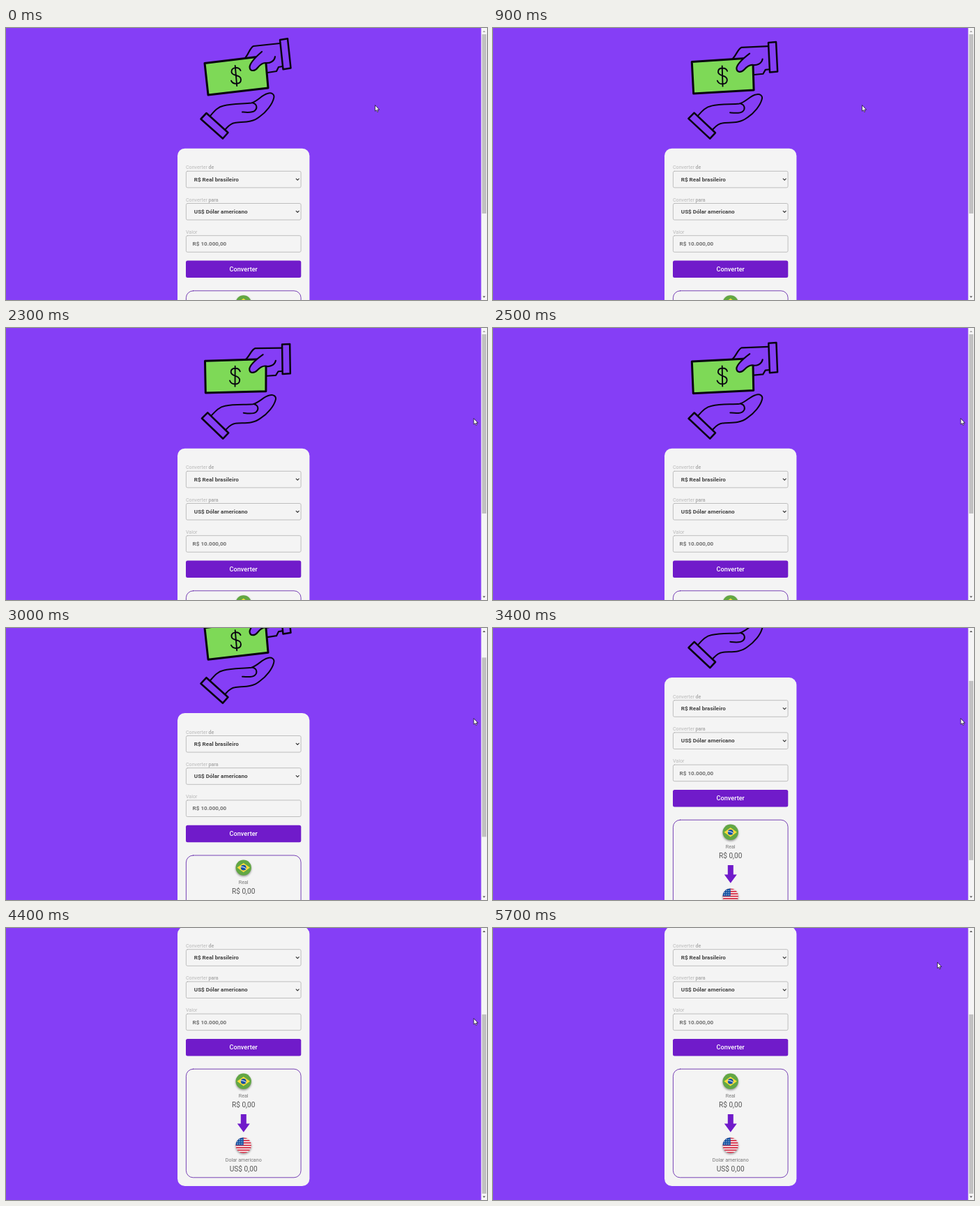
Animation of 690 by 390 pixels, one loop 5800 ms. Source, as an HTML page with a canvas:

```html
<!DOCTYPE html>
<html lang="pt-BR">
<head>
<meta charset="utf-8">
<title>Conversor de moedas</title>
<style>
html, body { margin: 0; width: 100%; height: 100%; overflow: hidden; background: #853ef6; }
canvas { display: block; width: 690px; height: 390px; }
</style>
</head>
<body>
<canvas id="stage" width="690" height="390"></canvas>
<script>
const ctx = document.getElementById('stage').getContext('2d');
const LOOP = 5800, STEP = 100;
const PURPLE = '#853ef6', DEEP = '#701bca', PANEL = '#f4f4f4', INK = '#090510';
const MID = 340.7;

// Keys are [time, value, value...]
const SWING = [[0, 0], [650, 1], [1250, 0], [2000, 1], [2300, 1], [2900, 0], [3000, 0], [3600, 1], [4200, 0]];
const POINTER = [[1400, 529.5, 111], [1600, 555, 114], [1800, 622, 145], [1900, 650, 165], [2000, 667, 150],
  [2100, 671, 130], [5100, 671, 130], [5300, 654, 108], [5500, 624, 68], [5600, 629, 56], [5700, 637.5, 49.5]];
const NOTCHES = [[2500, 50.8], [3050, 50.8], [3400, 50.8], [3750, 22.2]];

const clamp = x => Math.max(0, Math.min(1, x));
const smooth = x => x * x * (3 - 2 * x);

function sample(keys, t, ease = x => x) {
  let i = keys.findIndex(k => k[0] > t);
  if (i === 0) return keys[0].slice(1);
  if (i < 0) return keys[keys.length - 1].slice(1);
  const a = keys[i - 1], b = keys[i];
  const p = ease((t - a[0]) / (b[0] - a[0]));
  return a.slice(1).map((v, n) => v + (b[n + 1] - v) * p);
}

const scrollAt = t => NOTCHES.reduce((sum, [start, size]) => sum + size * smooth(clamp((t - start) / 250)), 0);

function shape(d, fill, stroke, width = 1) {
  const path = new Path2D(d);
  if (fill) { ctx.fillStyle = fill; ctx.fill(path); }
  if (stroke) { ctx.strokeStyle = stroke; ctx.lineWidth = width; ctx.stroke(path); }
}

function box(x, y, w, h, r, fill, stroke) {
  ctx.beginPath();
  ctx.roundRect(x, y, w, h, r);
  if (fill) { ctx.fillStyle = fill; ctx.fill(); }
  if (stroke) { ctx.strokeStyle = stroke; ctx.lineWidth = 0.9; ctx.stroke(); }
}

function disc(x, y, r, fill) {
  ctx.beginPath();
  ctx.arc(x, y, r, 0, Math.PI * 2);
  ctx.fillStyle = fill;
  ctx.fill();
}

function text(str, x, y, size, color, weight = 400, align = 'left') {
  ctx.font = `${weight} ${size}px Roboto, sans-serif`;
  ctx.textAlign = align;
  ctx.fillStyle = color;
  ctx.fillText(str, x, y);
  return ctx.measureText(str).width;
}

function rotated(degrees, x, y, draw) {
  ctx.save();
  ctx.translate(x, y);
  ctx.rotate(degrees * Math.PI / 180);
  ctx.translate(-x, -y);
  draw();
  ctx.restore();
}

function givingHand() {
  shape('M343 43C348 38 350 28 355 26L393 22L397 55L391 56L388 62L375 64Z', PURPLE);
  shape('M343 43C348 38 350 28 355 26L393 22M397 55L391 56L388 62L375 64', null, INK, 2.2);
  shape('M285 50.5L372 40L376 86L290 96Z', '#7ed957', INK, 3);
  shape('M336.5 61C334 55 323 56 323.5 63C324 70 337 66 337 74C337 81 326 82 323 75.5M328.7 54L331.2 83', null, INK, 1.9);
  shape('M367 34C360 40 350 50 349.5 56C350 63 357 62 361 57C365 52 368 50 372 50C378 51 385 48 386 41L388 26L358 29L354 38L360 39Z', PURPLE);
  shape('M367 34C360 40 350 50 349.5 56C350 63 357 62 361 57C365 52 368 50 372 50C378 51 385 48 386 41', null, INK, 2.2);
  shape('M393 17L404 15.3L408.5 57.5L397.5 59.3Z', PURPLE, INK, 2.5);
}

function takingHand() {
  shape('M293 126C299 119 304 113 312 111.5C325 108 340 109 352 107.5C361 105 367 96 375 94C381 92 386 95 384 101C382 109 374 120 364 127C352 137 338 134 328 136C321 137 318 142 314 146', null, INK, 2);
  shape('M339 120.5C345 121 353 122 357 118.5C361 115 360 109 354 107.5', null, INK, 2);
  shape('M287.5 122L318.5 150L311 158.5L279.5 130.5Z', PURPLE, INK, 2.6);
}

function field(label, strong, y, value, isSelect) {
  const w = text(label, 258, y - 2.6, 7.1, '#b9b9b9');
  text(strong, 258 + w, y - 2.6, 7.1, '#b0b0b0', 700);
  box(258.4, y + 0.3, 164.7, 23.6, 2, PANEL, '#b8b8b8');
  text(value, isSelect ? 269.8 : 267.6, y + 14.8, 8.1, isSelect ? '#424242' : '#707070', 700);
  if (isSelect) shape(`M416.2 ${y + 11.2}l2 2l2-2`, null, '#333', 1.2);
}

function flag(y, base, draw) {
  ctx.save();
  ctx.shadowColor = 'rgba(0,0,0,.4)';
  ctx.shadowBlur = 3;
  ctx.shadowOffsetY = 1.5;
  disc(MID, y, 11.2, base);
  ctx.restore();
  ctx.save();
  ctx.beginPath();
  ctx.arc(MID, y, 11.2, 0, Math.PI * 2);
  ctx.clip();
  ctx.translate(MID, y);
  draw();
  ctx.restore();
}

function brazil() {
  shape('M-9.2 0L0-6.6L9.2 0L0 6.6Z', '#fbdc3c');
  disc(0, 0, 3.9, '#1552a5');
  shape('M-3.7-1C-1-1.5 2-.3 3.6 1.5', null, '#fff', 1);
}

function usa() {
  ctx.fillStyle = '#d51f39';
  for (let i = 0; i < 7; i++) ctx.fillRect(-12, -11.2 + i * 3.45, 24, 1.72);
  ctx.fillStyle = '#1352a2';
  ctx.fillRect(-12, -12, 12, 12);
  ctx.fillStyle = '#fff';
  for (let row = 0; row < 3; row++)
    for (let col = 0; col < 3; col++) ctx.fillRect(-9 + col * 3, -8.5 + row * 3, 1.1, 1.1);
}

function converter() {
  box(246, 172.7, 189.4, 372, 10.5, PANEL);
  field('Converter ', 'de', 205, 'R$ Real brasileiro', true);
  field('Converter ', 'para', 251.2, 'US$ Dólar americano', true);
  field('Valor', '', 297.4, 'R$ 10.000,00', false);
  box(258, 333.6, 165.3, 24.4, 2.5, DEEP);
  text('Converter', MID, 349, 9.14, '#fff', 500, 'center');

  box(258.4, 376.8, 164.7, 155.6, 10, null, '#6a2fae');
  flag(394.4, '#62a744', brazil);
  text('Real', MID, 418, 7.1, '#777', 400, 'center');
  text('R$ 0,00', MID, 432, 10.15, '#555', 400, 'center');
  shape('M336.8 441.7H344.8V455H349.8L340.8 467.3L331.8 455H336.8Z', DEEP);
  flag(486.2, '#f5f5f5', usa);
  text('Dolar americano', MID, 510, 7.1, '#777', 400, 'center');
  text('US$ 0,00', MID, 524, 10.15, '#555', 400, 'center');
}

function scrollbar(offset) {
  ctx.fillStyle = '#f5f5f5';
  ctx.fillRect(681.6, 0, 8.4, 390);
  ctx.fillStyle = '#c1c1c1';
  ctx.fillRect(682.8, 9 + offset * 0.658, 6.2, 257);
  shape('M683.8 6L685.8 3.8L687.8 6Z', offset > 0 ? '#505050' : '#a3a3a3');
  shape('M683.8 384.5L685.8 386.7L687.8 384.5Z', '#505050');
}

function pointer(x, y) {
  ctx.save();
  ctx.translate(x, y);
  shape('M0 0V8.2L1.9 6.5L3.2 9.5L4.5 8.9L3.2 6.1H5.7Z', '#fff', '#15101c', 0.7);
  ctx.restore();
}

function render(t) {
  const offset = scrollAt(t);
  const [swing] = sample(SWING, t, smooth);
  ctx.lineJoin = ctx.lineCap = 'round';
  ctx.fillStyle = PURPLE;
  ctx.fillRect(0, 0, 690, 390);
  ctx.save();
  ctx.translate(0, -offset);
  rotated(5.2 * swing, 322, 54, givingHand);
  rotated(2.1 * swing, 306, 169, takingHand);
  converter();
  ctx.restore();
  scrollbar(offset);
  pointer(...sample(POINTER, t));
}

const start = performance.now();
function tick() {
  const t = (performance.now() - start) % LOOP;
  render(Math.floor(t / STEP) * STEP);
  requestAnimationFrame(tick);
}
tick();
</script>
</body>
</html>
```
